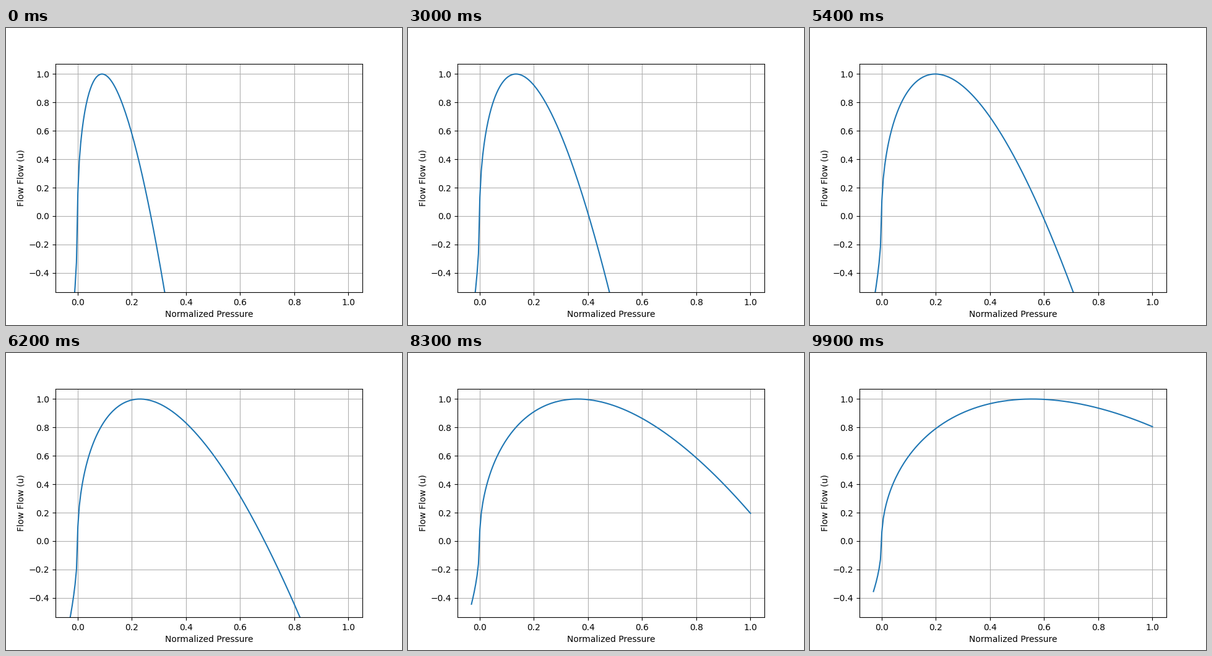
These frames come from a looping animation (640x480 px, 9950 ms). A matplotlib script:

```python
import numpy as np
import matplotlib.pyplot as plt
from matplotlib.animation import FuncAnimation

FRAMES = 199
INTERVAL = 50  # ms

pressure = np.linspace(-0.03, 1, 200)


def flow(closing):
    """Reed flow with unit peak; it falls to zero at the closing pressure."""
    x = pressure / closing
    return 1.5 * np.sqrt(3) * np.sign(x) * np.sqrt(np.abs(x)) * (1 - x)


def closing_pressure(frame):
    return (1.9228 - 0.0058 * frame) ** -2


fig, ax = plt.subplots(figsize=(6.4, 4.8), dpi=100)
# The axes keep the limits of the curve that closes at unit pressure.
line, = ax.plot(pressure, flow(1.0))
ax.set_xlim(ax.get_xlim())
ax.set_ylim(ax.get_ylim())
ax.set_xlabel("Normalized Pressure")
ax.set_ylabel("Flow Flow (u)")
ax.grid(True)


def update(frame):
    line.set_ydata(flow(closing_pressure(frame)))
    return line,


anim = FuncAnimation(fig, update, frames=FRAMES, interval=INTERVAL,
                     init_func=lambda: update(0), repeat=True, repeat_delay=0)
plt.show()
```
